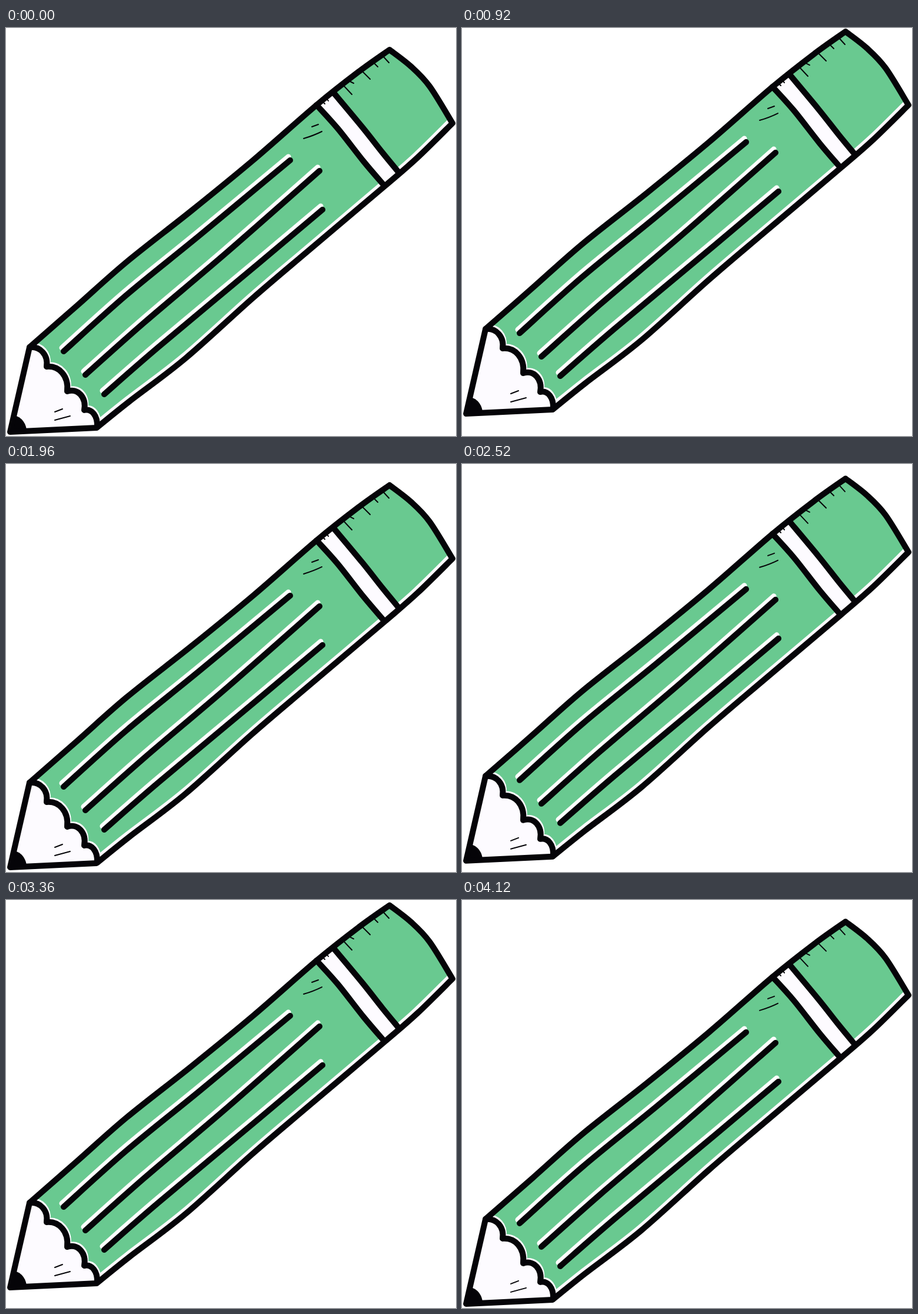
Animation of 765 by 694 pixels, one loop 4160 ms. Source, as an HTML page with a canvas:

```html
<!DOCTYPE html>
<html lang="en">
<head>
<meta charset="utf-8">
<title>Bobbing pencil</title>
<style>
html, body { margin: 0; width: 100%; height: 100%; overflow: hidden; background: #fff; }
canvas { display: block; }
</style>
</head>
<body>
<canvas id="stage" width="765" height="694"></canvas>
<script>
const ctx = document.getElementById('stage').getContext('2d');
const GREEN = '#69c990', PALE = '#fdfbff', INK = '#050408';
const CYCLE = 2080, STEP = 40, LIFT = 32;

// Smooth cubic segments through the points, continuing from the first one.
function through(pts) {
  let d = '';
  for (let i = 0; i < pts.length - 1; i++) {
    const a = pts[i - 1] || pts[i], b = pts[i], c = pts[i + 1], e = pts[i + 2] || c;
    d += `C${b[0] + (c[0] - a[0]) / 6},${b[1] + (c[1] - a[1]) / 6} ` +
         `${c[0] - (e[0] - b[0]) / 6},${c[1] - (e[1] - b[1]) / 6} ${c[0]},${c[1]}`;
  }
  return d;
}
const curve = pts => new Path2D(`M${pts[0]}` + through(pts));

const upper = [[652, 37], [600, 74], [528, 131], [420, 225], [315, 311], [205, 398], [120, 473], [40, 543]];
const lower = [[154, 680], [210, 635], [305, 562], [420, 459], [515, 378], [645, 268], [700, 220], [759, 162]];
const end = [[759, 162], [720, 99], [688, 65], [652, 37]];
const scallops = 'C58,541 72,556 69,576 C90,574 107,592 104,618 C122,612 137,628 133,650 C146,647 156,660 155,678';

const outline = new Path2D('M652,37' + through(upper) + 'L7,687 L154,680' + through(lower) + through(end) + 'Z');
const lowerEdge = curve(lower);
const wood = new Path2D('M40,543' + scallops + 'L7,687Z');
const woodEdge = new Path2D('M40,543' + scallops);
const lead = new Path2D('M10,659 C23,658 35,671 35,686 L7,688Z');

const bandLeft = [[528, 131], [564, 171], [608, 227], [643, 268]];
const bandRight = [[668, 246], [640, 212], [606, 169], [556, 109]];
const band = new Path2D('M528,131' + through(bandLeft) + 'L668,246' + through(bandRight) + 'Z');
const bandEdges = [bandLeft, bandRight].map(curve);

const grooves = [
  [[98, 550], [205, 454], [330, 352], [483, 225]],
  [[135, 590], [235, 501], [375, 382], [533, 243]],
  [[167, 623], [260, 542], [430, 400], [538, 309]]
].map(curve);

const marks = new Path2D(
  'M573,97L588,113 M583,90L591,94 M605,73L619,87 M627,61L632,66 M640,47L651,59' +
  'M537,124L542,129 M545,120L548,124' +
  'M520,168L531,164 M506,188Q523,183 537,176' +
  'M83,653L96,648 M83,667L109,660');

function line(path, color, width, dx = 0, dy = 0) {
  ctx.save();
  ctx.translate(dx, dy);
  ctx.strokeStyle = color;
  ctx.lineWidth = width;
  ctx.stroke(path);
  ctx.restore();
}

function fill(path, color) {
  ctx.fillStyle = color;
  ctx.fill(path);
}

function drawPencil() {
  ctx.save();
  ctx.clip(outline);
  fill(outline, GREEN);
  line(lowerEdge, PALE, 20);
  line(woodEdge, PALE, 9, 2, -3);
  fill(wood, PALE);
  fill(band, PALE);
  ctx.restore();

  for (const g of grooves) {
    line(g, '#fff', 9, -3, -6);
    line(g, INK, 10);
  }
  line(marks, INK, 2);
  for (const e of bandEdges) line(e, INK, 10);
  line(woodEdge, INK, 10);
  fill(lead, INK);
  line(outline, INK, 10);
}

function frame(now) {
  const t = Math.floor(now / STEP) * STEP;
  const rise = LIFT * (1 - Math.cos(2 * Math.PI * t / CYCLE)) / 2;
  ctx.setTransform(1, 0, 0, 1, 0, 0);
  ctx.fillStyle = '#fff';
  ctx.fillRect(0, 0, 765, 694);
  ctx.translate(0, -rise);
  ctx.lineCap = ctx.lineJoin = 'round';
  drawPencil();
}

let start;
function loop(now) {
  if (start === undefined) start = now;
  frame(now - start);
  requestAnimationFrame(loop);
}
frame(0);
requestAnimationFrame(loop);
</script>
</body>
</html>
```
